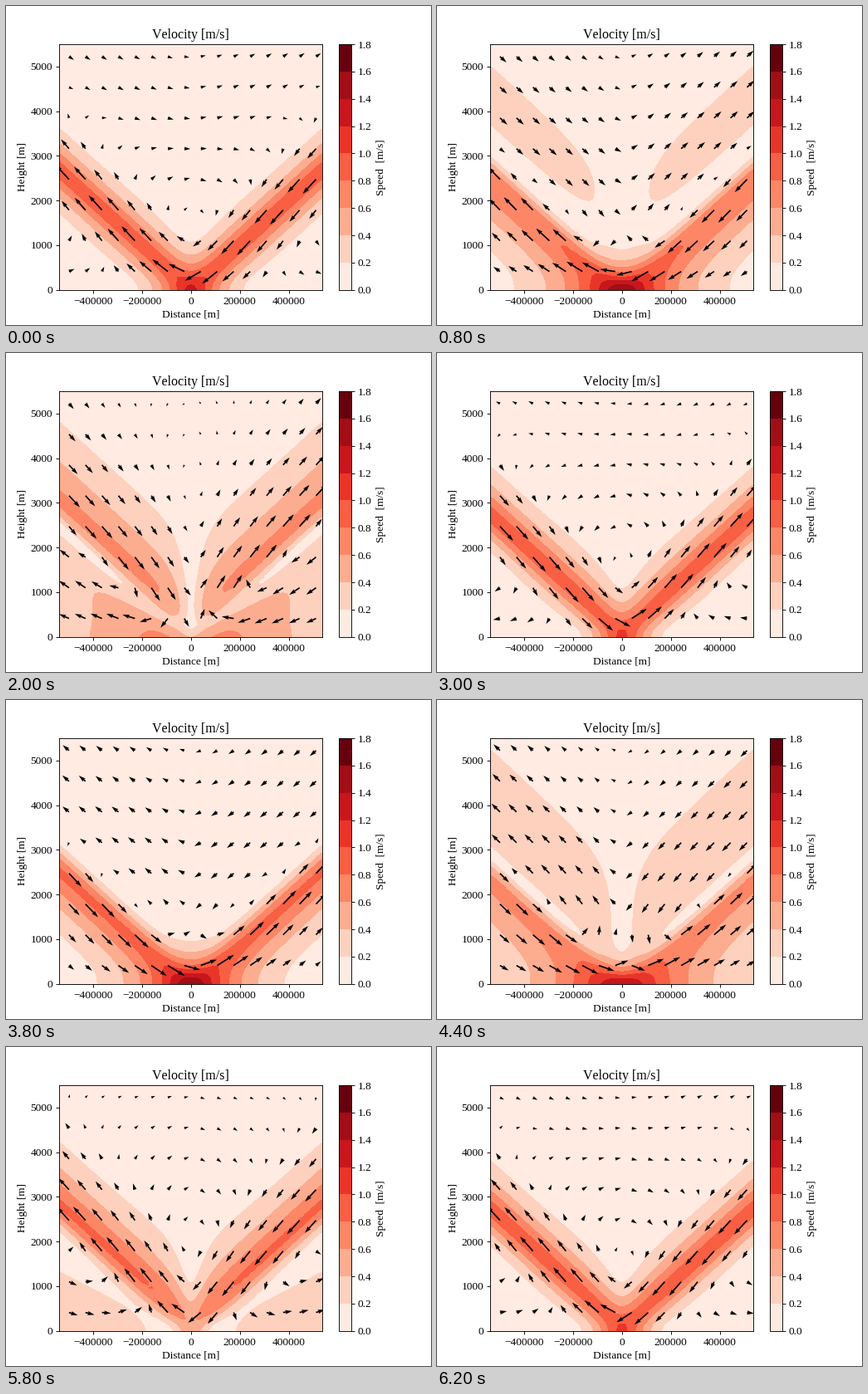
Write a matplotlib script that moves like this. It is 512 by 384 pixels and loops after 6.4 s.

```python
import numpy as np
import matplotlib.pyplot as plt
from matplotlib.animation import FuncAnimation

plt.rcParams.update({"font.family": "Liberation Serif", "font.size": 12,
                     "text.kerning_factor": 6})

FRAMES, INTERVAL = 32, 200
DEPTH, LENGTH = 1400, 280e3     # vertical and horizontal scales, m
COAST_WIDTH, SPEED_SCALE = 0.22, 1.06
LEVELS = np.linspace(0, 1.8, 10)

x = np.linspace(-538e3, 538e3, 81)
z = np.linspace(0, 5500, 41)
xi, zeta = x / LENGTH, z / DEPTH

# Linear sea-breeze stream function as a cosine integral over wavenumber k
k = np.linspace(0, 60, 1501)
weight = np.exp(-COAST_WIDTH * k) / (1 + k**2) * (k[1] - k[0])
weight[0] /= 2
across = weight * np.cos(np.outer(xi, k))
phase = np.outer(k, zeta)
psi_cos = (across @ np.sin(phase)).T
psi_sin = (across @ (np.cos(phase) - np.exp(-zeta))).T


def wind(frame):
    tau = 2 * np.pi * frame / FRAMES
    psi = -SPEED_SCALE * (np.cos(tau) * psi_cos + np.sin(tau) * psi_sin)
    dpsi_dz, dpsi_dx = np.gradient(psi, zeta, xi)
    return dpsi_dz, -dpsi_dx


def fill(u, w):
    return ax.contourf(x, z, np.hypot(u, w), levels=LEVELS, cmap="Reds",
                       vmin=0, vmax=1.7)


def arrow_parts(u, w):
    """Compress each component so that weak winds stay visible."""
    pick = (slice(3, None, 5), slice(3, None, 5))
    return [np.sign(c[pick]) * np.sqrt(np.abs(c[pick])) for c in (u, w)]


fig, ax = plt.subplots(figsize=(6.4, 4.8), dpi=80)
u, w = wind(0)
shading = fill(u, w)
bar = fig.colorbar(shading, ax=ax, ticks=LEVELS)
bar.set_label("Speed  [m/s]", labelpad=5)

arrows = ax.quiver(x[3::5], z[3::5], *arrow_parts(u, w),
                   scale=15, units="width", zorder=2)
ax.set(title="Velocity [m/s]", xlabel="Distance [m]",
       xlim=(x[0], x[-1]), ylim=(z[0], z[-1]),
       xticks=np.arange(-400000, 400001, 200000))
ax.set_ylabel("Height [m]", labelpad=3)


def update(frame):
    global shading
    u, w = wind(frame)
    shading.remove()
    shading = fill(u, w)
    arrows.set_UVC(*arrow_parts(u, w))
    return []


anim = FuncAnimation(fig, update, frames=FRAMES, interval=INTERVAL,
                     init_func=lambda: [], repeat=True, repeat_delay=0)
plt.show()
```
